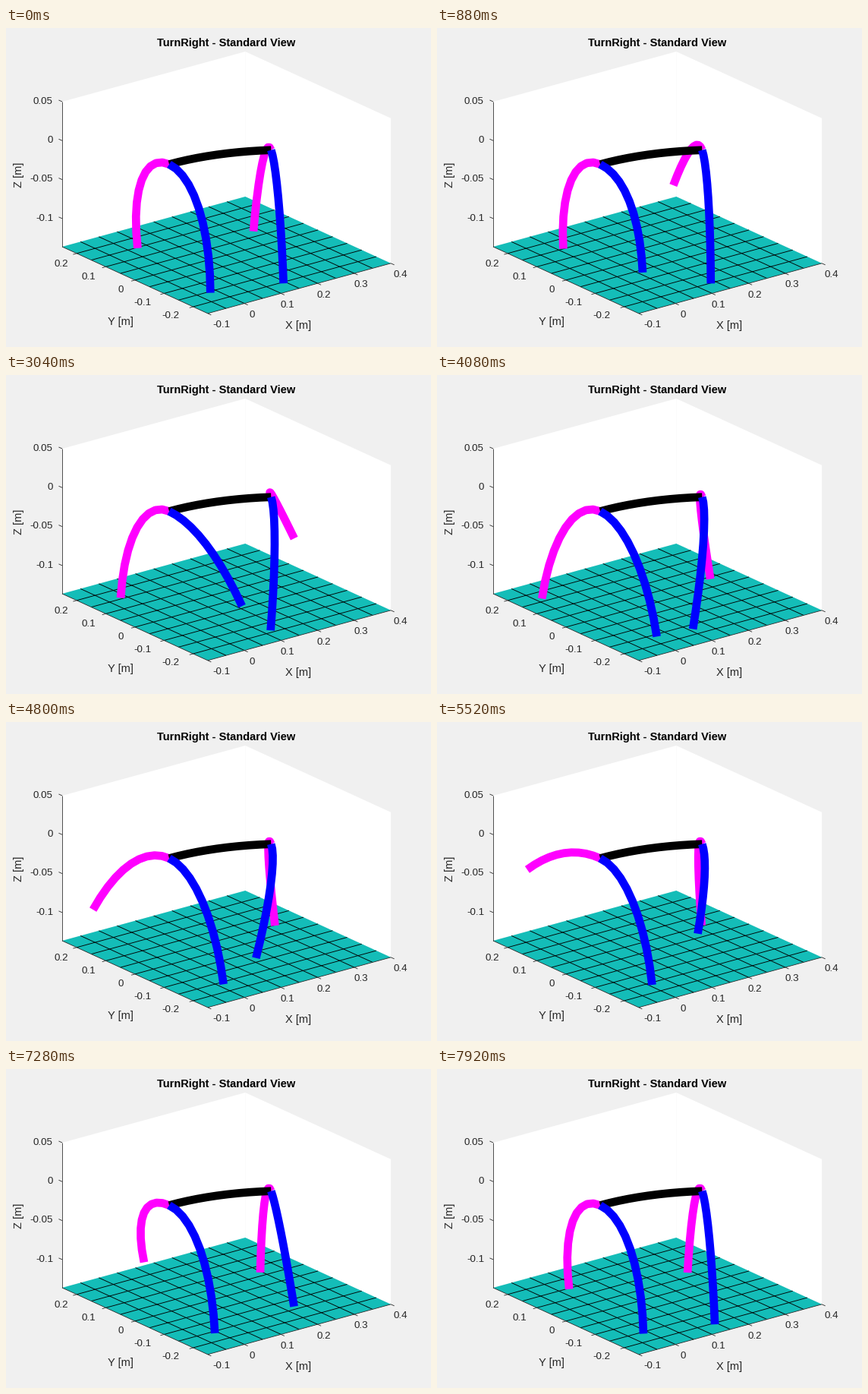
A matplotlib script for the animation above (8000 ms loop, 560 by 420 pixels).

```python
import numpy as np
import matplotlib.pyplot as plt
from matplotlib.animation import FuncAnimation

W, H, DPI = 560, 420, 100
FRAMES, INTERVAL = 100, 80
PX = 72 / DPI                      # points per pixel
INK, TEAL = "#262626", "#14bdb8"
MAGENTA, BLUE = "#ff00ff", "#0000ff"

fig = plt.figure(figsize=(W / DPI, H / DPI), dpi=DPI, facecolor="#f0f0f0")
ax = fig.add_axes([0, 0, 1, 1])
ax.set(xlim=(0, W), ylim=(H, 0))
ax.axis("off")


def line(a, b, color=INK, width=0.8, z=2):
    ax.plot([a[0], b[0]], [a[1], b[1]], color=color, lw=width * PX,
            zorder=z, solid_capstyle="butt")


def label(x, y, text, size=13.33, **kw):
    kw = {"ha": "center", "va": "baseline", "color": INK, **kw}
    ax.text(x, y, text, fontsize=size * PX, family="Liberation Sans", **kw)


# --- Box, floor and axes -------------------------------------------------
front = np.array([265.8, 375.8])
along_x = np.array([241.3, -66.0])
along_y = np.array([-191.8, -87.8])
up = np.array([0.0, -191.0])
left, right = front + along_y, front + along_x
back = left + along_x

for corner in (left, right):
    ax.fill(*np.array([corner, back, back + up, corner + up]).T,
            color="white", lw=0, zorder=0)
ax.fill(*np.array([front, right, back, left]).T, color=TEAL, lw=0, zorder=1)
for f in np.arange(1, 10) / 10:
    line(front + f * along_x, left + f * along_x, "black", 0.9)
    line(front + f * along_y, right + f * along_y, "black", 0.9)
line(front, right)
line(front, left)
line(left, left + up)

out_x = -along_x / np.hypot(*along_x) * 5
out_y = -along_y / np.hypot(*along_y) * 5

x_centers = (284, 324, 371, 419, 468, 520)
for k, (cx, text) in enumerate(zip(x_centers, ("-0.1", "0", "0.1", "0.2", "0.3", "0.4"))):
    p = front + along_x * k / 5
    line(p, p + out_y)
    label(cx, 394.5 - 13.3 * k, text)
for k, text in enumerate(("0.2", "0.1", "0", "-0.1", "-0.2")):
    p = left - along_y * (0.1 + 0.2 * k)
    line(p, p + out_x)
    label(82 + 36.6 * k, 314.5 + 16.8 * k, text, ha="right")
for k, text in enumerate(("0.05", "0", "-0.05", "-0.1")):
    p = left + up + np.array([0, 51.3 * k])
    line(p, p - out_y)
    label(62, 99.8 + 51.3 * k, text, ha="right")

label(385, 396, "X [m]", 14.67)
label(151, 391, "Y [m]", 14.67)
label(17, 193, "Z [m]", 14.67, rotation=90, va="center")
label(290, 24, "TurnRight - Standard View", 14.67, color="black", weight="bold")

# --- Robot: every part is an arc of constant curvature -------------------
LENGTH, YAW = 0.24, 0.55
ORIGIN = np.array([215.0, 179.5])
VIEW = np.array([[480, -386, 0], [-132, -176, -1026]])   # metres to pixels
DOWN = np.array([0, 0, -1])


def arc(base, tangent, normal, angle, n=11):
    s = np.linspace(0, angle, n)[:, None]
    pts = LENGTH / angle * (np.sin(s) * tangent + (1 - np.cos(s)) * normal)
    return base + pts @ VIEW.T


body = arc(ORIGIN, np.array([1, 0, 0]), np.array([0, -1, 0]), YAW)
rear = body[-1]

BEND = np.linspace(0.01, 2.3, 400)
REACH = (1 - np.cos(BEND)) / BEND   # sideways tip offset for each bend angle


class Leg:
    def __init__(self, base, yaw, side, color, z, shift, back_to, front_to,
                 depth, lift, swing, lean, skew):
        self.base, self.shift = base, shift
        self.ahead = np.array([np.cos(yaw), -np.sin(yaw), 0])
        self.out = side * np.array([np.sin(yaw), np.cos(yaw), 0])
        self.back_to, self.front_to = back_to, front_to
        self.depth, self.lift = depth, lift
        self.swing, self.lean, self.skew = swing, lean, skew
        self.art, = ax.plot([], [], color=color, lw=10.7 * PX, zorder=z,
                            solid_capstyle="butt", solid_joinstyle="round")

    def foot(self, i):
        """Forward and downward reach of the foot, as a share of the length."""
        phase = (i + 1 + self.shift) % FRAMES / (FRAMES / 2)
        if phase >= 1:             # on the ground, pushing back
            p = phase - 1
            return self.front_to + (self.back_to - self.front_to) * p, self.depth
        x = 2 * phase - 1          # in the air, overshooting at both ends
        mid = (self.front_to + self.back_to) / 2
        half = (self.front_to - self.back_to) / 2
        u = mid + half * x + (self.swing * x + self.lean) * (1 - x * x)
        bump = (1 - x * x) ** 2 * (1 + self.skew * x)
        return u, self.depth - self.lift * bump

    def update(self, i):
        u, w = self.foot(i)
        reach = np.hypot(u, w)
        normal = (u * self.ahead + w * DOWN) / reach
        pts = arc(self.base, self.out, normal, np.interp(reach, REACH, BEND))
        self.art.set_data(*pts.T)
        return self.art


HALF = FRAMES // 2
legs = [
    Leg(ORIGIN, 0, 1, MAGENTA, 4, HALF, -0.03, 0.185, 0.587, 0.40, 0.47, -0.025, 0),
    Leg(rear, YAW, 1, MAGENTA, 4, 0, -0.04, 0.17, 0.587, 0.40, 0.45, 0.02, 0),
    Leg(ORIGIN, 0, -1, BLUE, 6, 0, -0.11, 0.04, 0.543, 0.31, 0.30, -0.01, 0.35),
    Leg(rear, YAW, -1, BLUE, 6, HALF, -0.133, 0.018, 0.552, 0.32, 0.32, -0.025, 0.35),
]
ax.plot(*body.T, color="black", lw=10.7 * PX, zorder=5,
        solid_capstyle="butt", solid_joinstyle="round")


def draw(i):
    return [leg.update(i) for leg in legs]


anim = FuncAnimation(fig, draw, frames=FRAMES, interval=INTERVAL,
                     repeat=True, repeat_delay=0, blit=False)
plt.show()
```
